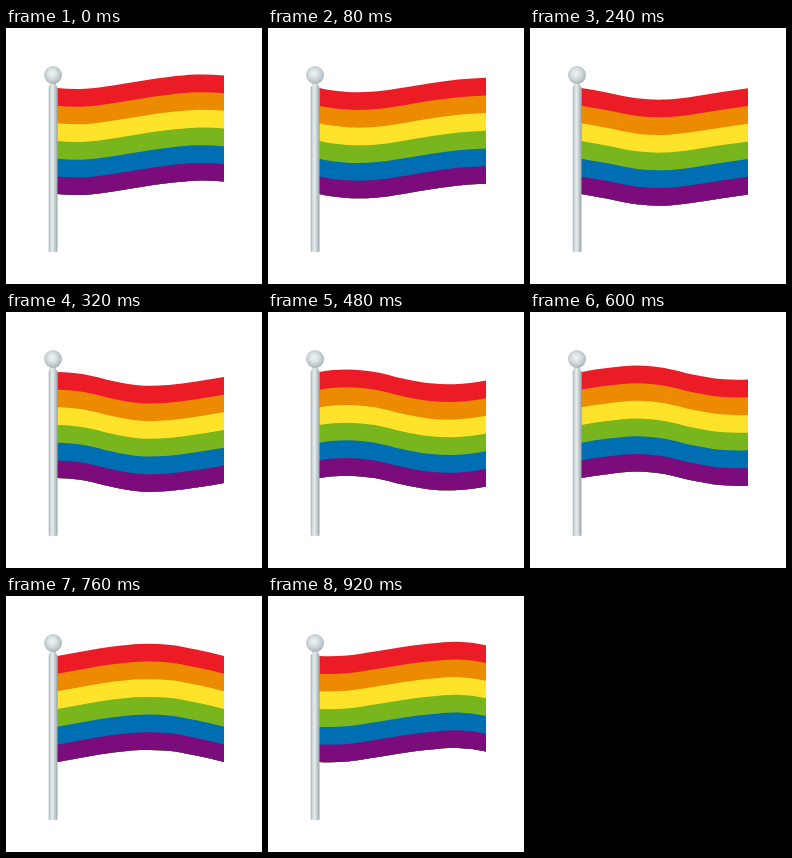
These frames come from a looping animation (256x256 px, 960 ms). An HTML page:

```html
<!DOCTYPE html>
<html lang="en">
<head>
<meta charset="utf-8">
<title>Waving flag</title>
<style>
  html, body { margin: 0; width: 100%; height: 100%; overflow: hidden; background: #fff; }
  svg { display: block; width: 100vw; height: 100vh; }
</style>
</head>
<body>
<svg viewBox="0 0 256 256">
  <defs>
    <linearGradient id="steel">
      <stop offset="0" stop-color="#a5b0b4"/>
      <stop offset=".2" stop-color="#cfd8db"/>
      <stop offset=".45" stop-color="#e6ecee"/>
      <stop offset=".7" stop-color="#c5cfd2"/>
      <stop offset="1" stop-color="#97a3a8"/>
    </linearGradient>
    <radialGradient id="knob" cx=".45" cy=".42" r=".6">
      <stop offset="0" stop-color="#f0f4f5"/>
      <stop offset=".4" stop-color="#d9e1e3"/>
      <stop offset=".8" stop-color="#b9c4c8"/>
      <stop offset="1" stop-color="#9eabb0"/>
    </radialGradient>
  </defs>
  <g id="flag"></g>
  <path d="M44 54H50V57.5Q51.5 58 51.5 60V223.5Q47 225 42.7 223.5V60Q42.7 58 44 57.5Z" fill="url(#steel)"/>
  <circle cx="47" cy="47" r="9" fill="url(#knob)"/>
</svg>
<script>
const LOOP = 960, STEP = 40;
const LEFT = 51.3, RIGHT = 218, STRIPE = 17.68;
const COLORS = ['#ec1c27', '#ec8a00', '#ffe32b', '#79b51c', '#006eb3', '#7c0b7c'];

// Height of the top edge at evenly spaced points, left to right, at each time.
const POSES = [
  [0, 60, 60.8, 57.5, 53, 49, 46.6, 47.5],
  [160, 60, 66, 69, 67, 62.5, 58, 55.2],
  [320, 60, 62.5, 69, 73.5, 73, 69.5, 65],
  [480, 60, 57.6, 60, 66.5, 71.3, 72, 68.5],
  [600, 60, 55.8, 53.5, 56, 62.5, 67, 67.6],
  [760, 60, 55, 50.5, 48, 48.7, 53.5, 60],
  [920, 60, 59.5, 55.5, 51, 47.5, 45.8, 49.3]
];
const POINTS = POSES[0].length - 1;
const DX = (RIGHT - LEFT) / (POINTS - 1);

// Pose by index, wrapping around the loop with its time shifted to match.
function pose(i) {
  const n = POSES.length, turn = Math.floor(i / n);
  const [t, ...ys] = POSES[i - turn * n];
  return { t: t + turn * LOOP, ys };
}

// Slope through three unevenly spaced samples.
function slope(a, b, c, k) {
  const h = b.t - a.t, g = c.t - b.t;
  const s = (b.ys[k] - a.ys[k]) / h, r = (c.ys[k] - b.ys[k]) / g;
  return (s * g + r * h) / (h + g);
}

function edgeAt(t) {
  let i = POSES.length - 1;
  while (POSES[i][0] > t) i--;
  const [a, b, c, d] = [i - 1, i, i + 1, i + 2].map(pose);
  const h = c.t - b.t, u = (t - b.t) / h, v = 1 - u;
  return b.ys.map((y, k) =>
    y * v * v * (1 + 2 * u) + c.ys[k] * u * u * (1 + 2 * v) +
    h * u * v * (v * slope(a, b, c, k) - u * slope(b, c, d, k)));
}

function curve(ys) {
  const last = ys.length - 1;
  const m = ys.map((y, k) => {
    if (k === 0) return (-3 * y + 4 * ys[1] - ys[2]) / 2;
    if (k === last) return (3 * y - 4 * ys[k - 1] + ys[k - 2]) / 2;
    return (ys[k + 1] - ys[k - 1]) / 2;
  });
  let d = `M${LEFT} ${ys[0]}`;
  for (let k = 0; k < last; k++) {
    const x = LEFT + k * DX;
    d += `C${x + DX / 3} ${ys[k] + m[k] / 3} ${x + DX * 2 / 3} ${ys[k + 1] - m[k + 1] / 3} ${x + DX} ${ys[k + 1]}`;
  }
  return d;
}

// Each stripe is a thick ribbon between the edge curve and its copy below.
function ribbon(ys, top, bottom) {
  const lower = curve(ys.map(y => y + bottom)).match(/-?[\d.]+/g);
  let back = '';
  for (let i = lower.length - 2; i >= 0; i -= 2) {
    const lead = i === lower.length - 2 ? 'L' : i === lower.length - 4 ? 'C' : ' ';
    back += `${lead}${lower[i]} ${lower[i + 1]}`;
  }
  return curve(ys.map(y => y + top)) + back + 'Z';
}

const flag = document.getElementById('flag');
const stripes = COLORS.map(color => {
  const path = document.createElementNS('http://www.w3.org/2000/svg', 'path');
  path.setAttribute('fill', color);
  return flag.appendChild(path);
});

let shown = -1;
function draw(now) {
  const t = Math.floor(now % LOOP / STEP) * STEP;
  if (t !== shown) {
    shown = t;
    const ys = edgeAt(t);
    // Stripes reach down to the hem so that no seams show between them.
    stripes.forEach((s, i) => s.setAttribute('d', ribbon(ys, i * STRIPE, COLORS.length * STRIPE)));
  }
}

const start = performance.now();
function tick() {
  draw(performance.now() - start);
  requestAnimationFrame(tick);
}
tick();
</script>
</body>
</html>
```
